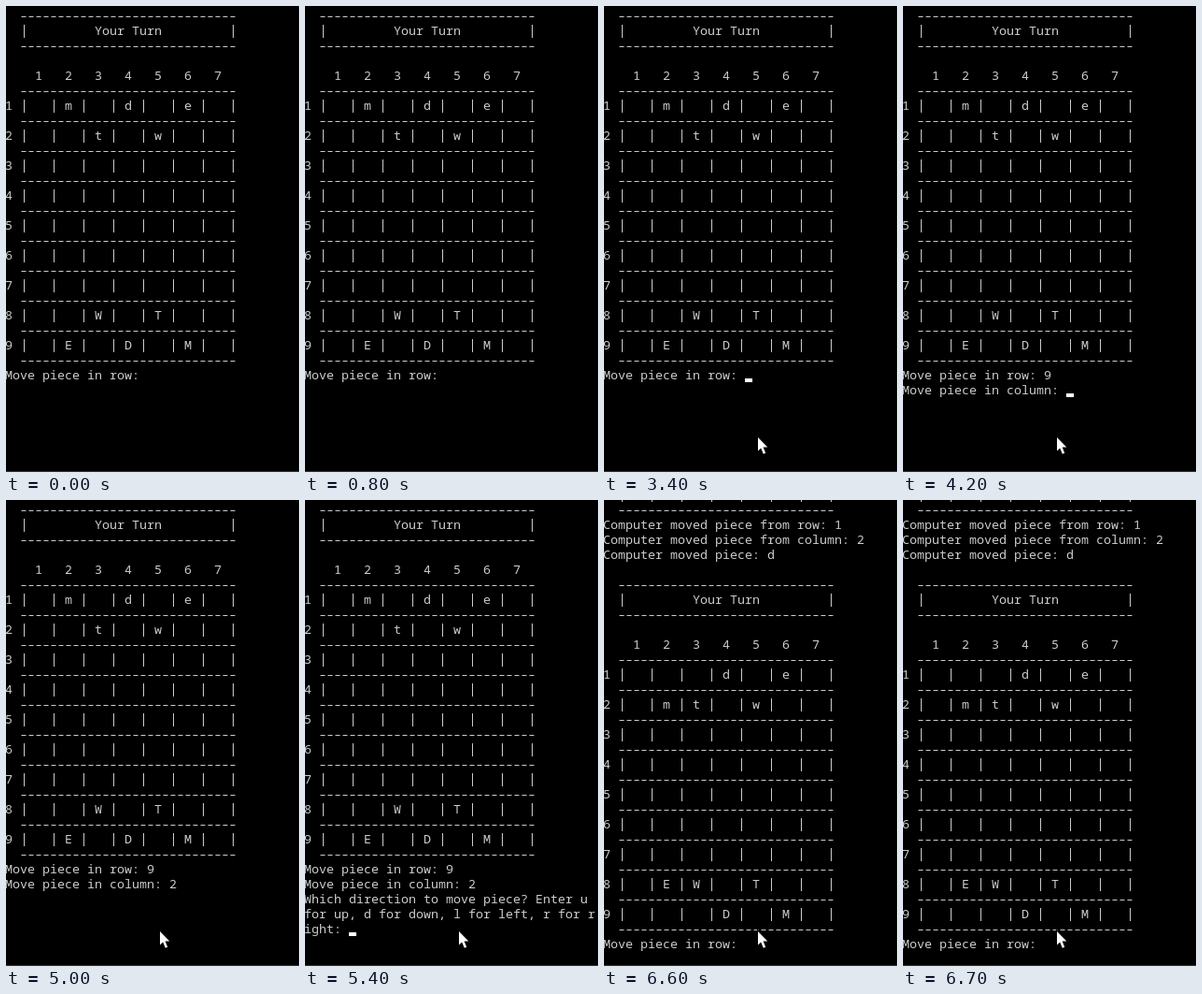
Write an HTML page with a canvas that moves like this. It is 314 by 498 pixels and loops after 7.2 s.

```html
<!DOCTYPE html>
<html lang="en">
<head>
<meta charset="utf-8">
<title>Console board game</title>
<style>
  html, body { margin: 0; width: 100%; height: 100%; overflow: hidden; background: #000; }
  canvas { display: block; }
</style>
</head>
<body>
<canvas id="screen" width="314" height="498"></canvas>
<script>
const ctx = document.getElementById('screen').getContext('2d');
const LOOP = 7200, COLS = 39, CELL_W = 8, CELL_H = 16, LEFT = -1, TOP = 3;
const INK = '#ccc';
const RULE = '  ' + '-'.repeat(29);

// Each string holds the pieces of one row, columns 1 to 7
const EMPTY = Array(5).fill('       ');
const before = [' m d e ', '  t w  ', ...EMPTY, '  W T  ', ' E D M '];
const after = ['   d e ', ' mt w  ', ...EMPTY, ' EW T  ', '   D M '];

const boardRow = (row, n) => `${n} | ${[...row].join(' | ')} |`;

function boardLines(board) {
  const gap = ' '.repeat(9);
  const lines = [RULE, `  |${gap}Your Turn${gap}|`, RULE, '', '    ' + [1, 2, 3, 4, 5, 6, 7].join('   '), RULE];
  board.forEach((row, i) => lines.push(boardRow(row, i + 1), RULE));
  return lines;
}

const wrap = text => text.match(new RegExp(`.{1,${COLS}}`, 'g'));

function consoleLines(t) {
  if (t >= 6600) {
    return [
      RULE,
      'Computer moved piece from row: 1',
      'Computer moved piece from column: 2',
      'Computer moved piece: d',
      '',
      ...boardLines(after),
      'Move piece in row: '
    ];
  }
  const typed = (key, time) => t >= time ? key : '';
  const lines = [...boardLines(before), 'Move piece in row: ' + typed('9', 3700)];
  if (t >= 4200) lines.push('Move piece in column: ' + typed('2', 4900));
  if (t >= 5400) {
    lines.push(...wrap('Which direction to move piece? Enter u for up, ' +
      'd for down, l for left, r for right: ' + typed('u', 6000)));
  }
  return lines;
}

function drawLine(text, n) {
  const y = TOP + n * CELL_H;
  [...text].forEach((ch, i) => {
    const x = LEFT + i * CELL_W;
    if (ch === '-') ctx.fillRect(x + 1.5, y + 8, 5, 1);
    else if (ch === '|') ctx.fillRect(x + 4, y + 1, 1, 14);
    else if (ch !== ' ') ctx.fillText(ch, x, y + 12);
  });
}

function drawCaret(lines) {
  const n = lines.length - 1;
  ctx.fillStyle = '#fff';
  ctx.fillRect(LEFT + lines[n].length * CELL_W, TOP + n * CELL_H + 11, CELL_W, 4);
}

const arrow = new Path2D('M0 0V14.5L3.2 11.5L5.8 17.8L8.2 16.8L5.6 10.6H10.3Z');

function drawPointer(x, y) {
  ctx.save();
  ctx.translate(x, y);
  ctx.fillStyle = '#fff';
  ctx.strokeStyle = '#000';
  ctx.lineWidth = 2;
  ctx.stroke(arrow);
  ctx.fill(arrow);
  ctx.restore();
}

const caretShown = t => [[3400, 3900], [4200, 5000], [5400, 6100]].some(([a, b]) => t >= a && t < b);

function draw(t) {
  ctx.fillStyle = '#000';
  ctx.fillRect(0, 0, 314, 498);
  ctx.fillStyle = '#333';
  ctx.fillRect(0, 497, 314, 1);

  ctx.fillStyle = INK;
  ctx.font = '13.3333px "Noto Sans Mono", "DejaVu Sans Mono", monospace';
  const lines = consoleLines(t);
  lines.forEach(drawLine);
  // The scrolled-off row still peeks in at the top edge
  if (t >= 6600) drawLine(boardRow(after[8], 9), -1);

  if (caretShown(t)) drawCaret(lines);
  if (t >= 2500) drawPointer(t < 2600 ? 172 : 165, 461);
}

const start = performance.now();
function tick() {
  draw((performance.now() - start) % LOOP);
  requestAnimationFrame(tick);
}
tick();
</script>
</body>
</html>
```
